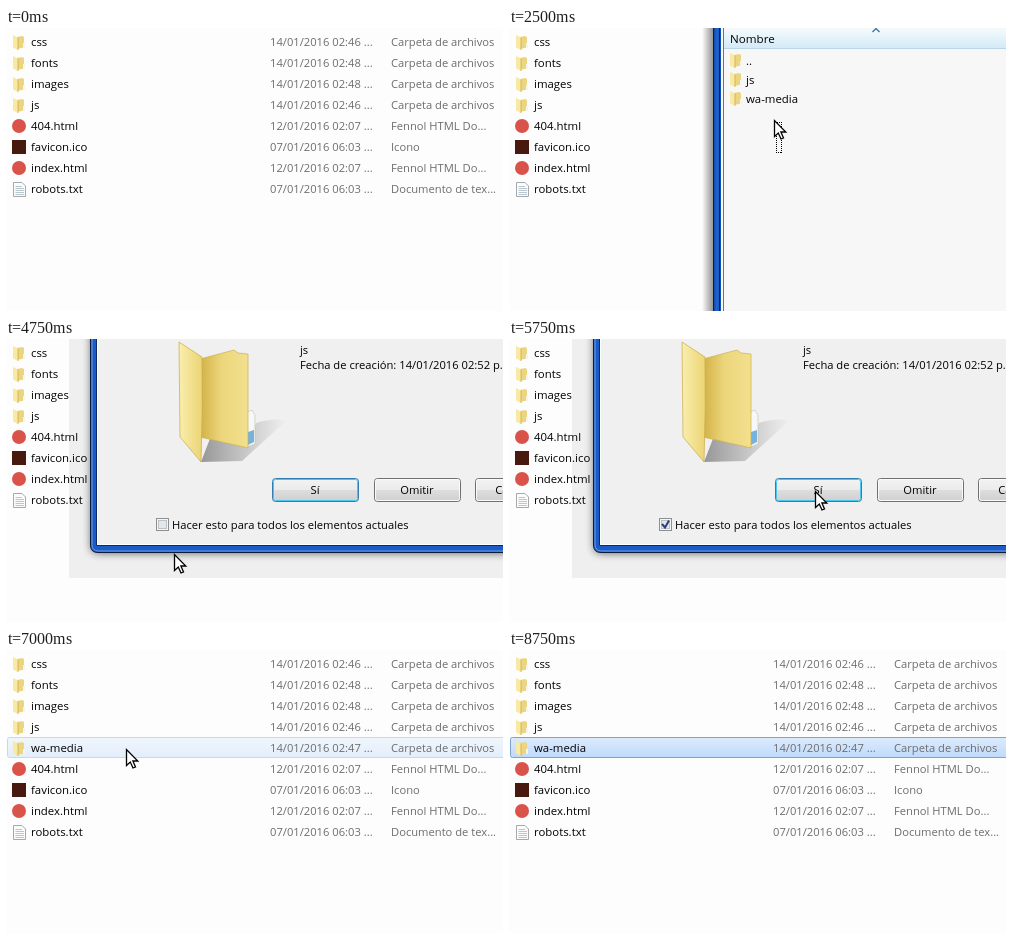
Recreate the animation shown at these times as an HTML page. Size 497 by 283 pixels, loop 9.25 s.

```html
<!DOCTYPE html>
<html lang="es">
<head>
<meta charset="utf-8">
<title>Copiar carpetas</title>
<style>
html, body { margin: 0; width: 100%; height: 100%; overflow: hidden; background: #fdfdfd; }
svg { display: block; width: 497px; height: 283px; }
text { font: 11.2px "Open Sans", "Noto Sans", sans-serif; fill: #000; white-space: pre; }
.name { font-size: 11.4px; }
.info { fill: #6d6d6d; }
.mid { text-anchor: middle; }
.picked text { fill: #fff; }
</style>
</head>
<body>
<svg viewBox="0 0 497 283">
  <defs>
    <linearGradient id="shade"><stop stop-color="#000" stop-opacity="0"/><stop offset="1" stop-color="#000" stop-opacity=".45"/></linearGradient>
    <linearGradient id="head" x2="0" y2="1"><stop stop-color="#f4fafd"/><stop offset="1" stop-color="#d3eaf7"/></linearGradient>
    <linearGradient id="btn" x2="0" y2="1"><stop stop-color="#f3f3f3"/><stop offset=".48" stop-color="#ebebeb"/><stop offset=".52" stop-color="#dddddd"/><stop offset="1" stop-color="#cfcfcf"/></linearGradient>
    <linearGradient id="row" x2="0" y2="1"><stop stop-color="#dcebfc"/><stop offset="1" stop-color="#bfdafb"/></linearGradient>
    <linearGradient id="edge"><stop stop-color="#0d3f9c"/><stop offset=".5" stop-color="#1f66cf"/><stop offset="1" stop-color="#0f4cb0"/></linearGradient>
    <linearGradient id="back"><stop stop-color="#d2b145"/><stop offset=".45" stop-color="#ecd67c"/><stop offset="1" stop-color="#f3e08e"/></linearGradient>
    <linearGradient id="flap"><stop stop-color="#f9eeae"/><stop offset="1" stop-color="#ecd473"/></linearGradient>
    <linearGradient id="cast"><stop stop-color="#666" stop-opacity=".65"/><stop offset="1" stop-color="#777" stop-opacity="0"/></linearGradient>
    <filter id="soft" x="-10%" y="-10%" width="120%" height="120%"><feGaussianBlur stdDeviation="4"/></filter>
    <g id="folder">
      <path d="M5 2L10 1L12 2V12.500L5 14Z" fill="#ecd581"/>
      <path d="M1 0L6 2.500V15L1 12.500Z" fill="#f8e9a4"/>
      <path d="M6 2.500V15" stroke="#cfab45" stroke-width=".8"/>
      <path d="M11 8H13V13H11Z" fill="#f3f5ee"/>
    </g>
    <circle id="page" cx="7" cy="7" r="7" fill="#d9534a"/>
    <rect id="icon" width="14" height="14" fill="#47190f"/>
    <g id="doc">
      <path d="M1.500 .5H10L13.500 4V14.500H1.500Z" fill="#fcfcfc" stroke="#a3a9ad"/>
      <path d="M3.500 4.500H10M3.500 6.500H12M3.500 8.500H12M3.500 10.500H12M3.500 12.500H12" stroke="#b9c6cd"/>
    </g>
  </defs>

  <rect width="497" height="283" fill="#fdfdfd"/>
  <rect id="mark" x="1.5" y="87.500" width="500" height="20" rx="2" fill="url(#row)" stroke="#7da2ce"/>
  <g id="list"></g>

  <g id="panel">
    <rect x="193" width="12" height="283" fill="url(#shade)"/>
    <rect x="204" width="293" height="283" fill="#f7f7f7"/>
    <rect x="204" width="8" height="283" fill="url(#edge)"/>
    <path d="M204.500 0V283M210.500 0V283" stroke="#0b1f45"/>
    <path d="M214.500 0V283" stroke="#6b7178"/>
    <rect x="215" y="1" width="282" height="19" fill="url(#head)"/>
    <path d="M215 20.500H497" stroke="#b9d6e6"/>
    <path d="M363.500 4L367 .5L370.500 4" fill="none" stroke="#3c6f96" stroke-width="1.300"/>
    <text x="221" y="15" style="font-size:11.6px">Nombre</text>
    <g id="items"></g>
  </g>

  <g id="dialog">
    <rect x="63" width="434" height="239" fill="#000" opacity=".055"/>
    <path d="M85 -30V207Q85 214 92 214H530V-30Z" opacity=".6" filter="url(#soft)"/>
    <path d="M84.500 -5V206Q84.500 213.500 92 213.500H500V-5Z" fill="#1a5bc8" stroke="#0a1a3c"/>
    <path d="M86 -5V205.500Q86 212 92.500 212H500" fill="none" stroke="#6f9fe2"/>
    <path d="M90.500 -5V206.500H500V-5Z" fill="#f0f0f0" stroke="#0c2a66"/>
    <path d="M91.500 -5V205.500H500" fill="none" stroke="#fff"/>
    <path d="M195 123L205 97L243 104L250 84Q264 79 281 81L236 122Z" fill="url(#cast)"/>
    <path d="M241 73L246 71L249 76V105L241 108Z" fill="#f5f8fa" stroke="#c9c2a0" stroke-width=".6"/>
    <path d="M242 93L248 91V103L242 106Z" fill="#75b2de"/>
    <path d="M194 20L228 11L232 14L242 15V109L194 98Z" fill="url(#back)" stroke="#cdb050" stroke-width=".7"/>
    <path d="M173 3L196 18Q197 70 195 123L174 98Z" fill="url(#flap)" stroke="#c9a94a" stroke-width=".7"/>
    <text x="294" y="15">js</text>
    <text x="294" y="30">Fecha de creación: 14/01/2016 02:52 p.m.</text>
    <g id="buttons"></g>
    <rect x="150.500" y="179.500" width="12" height="12" fill="#f6f6f6" stroke="#8e8f8f"/>
    <rect x="152.500" y="181.500" width="8" height="8" fill="#e4e7e9" stroke="#bcc1c5"/>
    <path id="tick" d="M153 185L156 188.500L160 181.500" fill="none" stroke="#2a3f7d" stroke-width="2"/>
    <text x="166" y="190">Hacer esto para todos los elementos actuales</text>
  </g>

  <rect id="marquee" fill="none" stroke="#000" stroke-dasharray="1 1" shape-rendering="crispEdges"/>
  <g id="cursor">
    <g id="drag">
      <rect x="2.500" y="16.500" width="11" height="8" fill="none" stroke="#000" stroke-dasharray="2 1"/>
      <rect x="10.500" y="20.500" width="10" height="10" fill="#fff" stroke="#000"/>
      <path d="M12.500 25.500H18.500M15.500 22.500V28.500" stroke="#000"/>
    </g>
    <path d="M.5 .5V16.500L4.300 13L7 19L9.500 18L6.900 12H11.800Z" fill="#fff" stroke="#000" stroke-width="1.300"/>
  </g>
</svg>
<script>
const $ = id => document.getElementById(id);
const show = (id, on) => $(id).style.display = on ? '' : 'none';

const STEP = 250, LOOP = 9250;
const FOLDER = 'Carpeta de archivos', PAGE = 'Fennol HTML Do...';
const files = [
  ['folder', 'css', '14/01/2016 02:46', FOLDER],
  ['folder', 'fonts', '14/01/2016 02:48', FOLDER],
  ['folder', 'images', '14/01/2016 02:48', FOLDER],
  ['folder', 'js', '14/01/2016 02:46', FOLDER],
  ['page', '404.html', '12/01/2016 02:07', PAGE],
  ['icon', 'favicon.ico', '07/01/2016 06:03', 'Icono'],
  ['page', 'index.html', '12/01/2016 02:07', PAGE],
  ['doc', 'robots.txt', '07/01/2016 06:03', 'Documento de tex...']
];
const copied = files.slice();
copied.splice(4, 0, ['folder', 'wa-media', '14/01/2016 02:47', FOLDER]);

const listMarkup = rows => rows.map(([icon, name, date, type], i) => `
  <use href="#${icon}" x="6" y="${7 + 21 * i}"/>
  <g transform="translate(0 ${18 + 21 * i})">
    <text class="name" x="25">${name}</text>
    <text class="info" x="264">${date} ...</text>
    <text class="info" x="385">${type}</text>
  </g>`).join('');
const lists = [files, copied].map(listMarkup);

$('items').innerHTML = ['..', 'js', 'wa-media'].map((name, i) => `
  <g transform="translate(0 ${23 + 19 * i})">
    <rect x="235" width="262" height="19" fill="#3399ff" display="none"/>
    <use href="#folder" x="220" y="2"/>
    <path d="M221 2L226 4L230 3L233 10V15L226 17L221 14.500Z" fill="#3399ff" opacity=".55" display="none"/>
    <text class="name" x="237" y="14">${name}</text>
  </g>`).join('');

$('buttons').innerHTML = ['Sí', 'Omitir', 'Cancelar'].map((name, i) => {
  const x = [266, 368, 469][i];
  return `<rect x="${x + .5}" y="139.500" width="86" height="23" rx="3" fill="url(#btn)" stroke="${i ? '#707070' : '#2f7fb3'}"/>
    <rect x="${x + 1.5}" y="140.500" width="84" height="21" rx="2" fill="none" stroke="${i ? '#fafafa' : '#48c6f2'}"/>
    <text class="mid" x="${x + 43}" y="155">${name}</text>`;
}).join('');

// Pointer path: step, x, y
const path = [
  [6, 470, 250], [9, 272, 124], [10, 265, 92], [12, 240, 48], [13, 252, 62],
  [15, 246, 108], [17, 89, 206], [19, 168, 215], [21, 156, 187], [23, 306, 152],
  [25, 311, 228], [26, 311, 228], [28, 120, 99], [29, 120, 99], [30, 145, 241],
  [31, 148, 246], [32, 148, 246], [33, 262, 205], [34, 470, 146]
];

function pointer(step) {
  const i = Math.max(1, path.findIndex(p => p[0] >= step));
  const [s0, x0, y0] = path[i - 1], [s1, x1, y1] = path[i];
  const k = (step - s0) / (s1 - s0);
  return [Math.round(x0 + (x1 - x0) * k), Math.round(y0 + (y1 - y0) * k)];
}

function pick(i, on) {
  const item = $('items').children[i];
  item.classList.toggle('picked', on);
  for (const part of [item.children[0], item.children[2]])
    part.setAttribute('display', on ? 'inline' : 'none');
}

function draw(step) {
  const during = (from, to) => step >= from && step < to;
  $('list').innerHTML = lists[+(step >= 24)];
  show('panel', during(6, 18));
  pick(1, during(12, 18));
  pick(2, during(11, 18));
  show('dialog', during(18, 24));
  show('tick', step >= 21);
  show('mark', step >= 28);
  $('mark').setAttribute('opacity', step === 28 ? .4 : 1);
  show('cursor', during(6, 35));
  show('drag', during(15, 18));
  show('marquee', during(10, 13));
  if (!during(6, 35)) return;
  const [x, y] = pointer(step);
  $('cursor').setAttribute('transform', `translate(${x} ${y})`);
  const box = { x: x + 2.5, y: y + 2.5, width: Math.max(0, 270 - x), height: Math.max(0, 122 - y) };
  for (const key in box) $('marquee').setAttribute(key, box[key]);
}

let last = -1;
function tick(now) {
  const step = Math.floor(now % LOOP / STEP);
  if (step !== last) draw(last = step);
  requestAnimationFrame(tick);
}
tick(performance.now());
</script>
</body>
</html>
```
